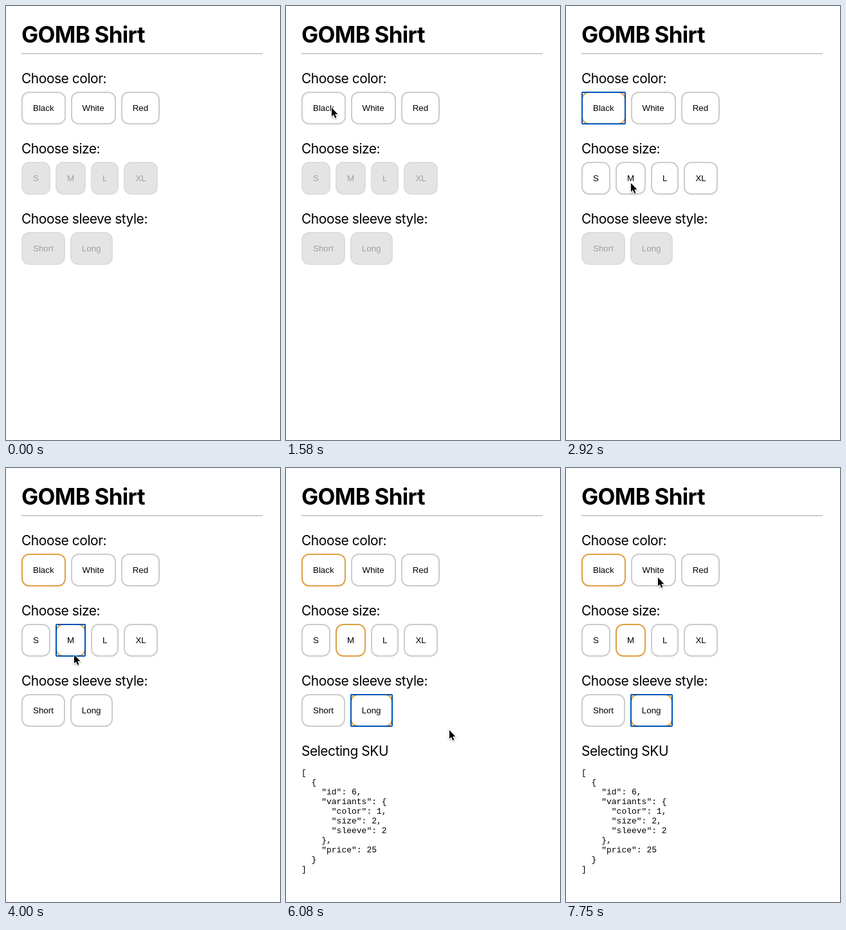
An HTML page for the animation above (8000 ms loop, 426x674 px).

```html
<!DOCTYPE html>
<html lang="en">
<head>
<meta charset="utf-8">
<title>Shirt options</title>
<style>
html, body { margin: 0; width: 100%; height: 100%; overflow: hidden; background: #fff; color: #000; }
body { position: relative; font-family: Inter, sans-serif; cursor: default; }
h1, h2, section, pre, #cursor { position: absolute; margin: 0; }
h1 {
  left: 24px; top: 24px; width: 375px; height: 49px; border-bottom: 2px solid #ccc;
  font-size: 35px; line-height: 40px; letter-spacing: -.021em; white-space: nowrap;
}
section { left: 24px; }
h2 { left: 0; top: 1px; font-size: 21px; font-weight: 400; line-height: 26px; letter-spacing: -.023em; white-space: nowrap; }
.row { display: flex; gap: 8px; margin-top: 34px; }
.option {
  position: relative; box-sizing: border-box; height: 51px; padding: 0 16px;
  border: 2px solid #ccc; border-radius: 12px;
  font: 13.333px/47px "Liberation Sans", Arial, sans-serif;
}
.off .option { background: #e4e4e4; border-color: #ddd; color: #a0a0a0; }
.option.picked { border-color: #dfa044; }
.option.focus::after {
  content: ""; position: absolute; inset: -2px; border: 2px solid #0053b6; border-radius: 2px;
}
pre { left: 0; top: 40px; font: 13px/15px "Liberation Mono", Courier, monospace; }
#cursor { left: 0; top: 0; overflow: visible; filter: drop-shadow(0 1px 1px #0005); }
</style>
</head>
<body>
<h1>GOMB Shirt</h1>
<svg id="cursor" width="14" height="20">
  <path d="M0 0V13.6L3 10.8 5.3 16 7.4 15.1 5.2 10H9.4Z" stroke="#fff" stroke-width="2" paint-order="stroke"/>
</svg>
<script>
const LOOP = 8000, FPS = 12, CLICK = 166;
const groups = [
  { title: "Choose color:", options: ["Black", "White", "Red"], pick: "Black", press: 2080 },
  { title: "Choose size:", options: ["S", "M", "L", "XL"], pick: "M", press: 3580 },
  { title: "Choose sleeve style:", options: ["Short", "Long"], pick: "Long", press: 4915 },
];
const sku = [{ id: 6, variants: { color: 1, size: 2, sleeve: 2 }, price: 25 }];
// where each pointer move ends, and when it runs
const moves = [
  { from: 420, to: 750, x: 382, y: 429 },
  { from: 920, to: 1580, x: 71, y: 158 },
  { from: 2420, to: 3040, x: 105, y: 288 },
  { from: 3920, to: 4750, x: 139, y: 379 },
  { from: 5590, to: 5830, x: 259, y: 420 },
  { from: 6050, to: 6250, x: 187, y: 239 },
  { from: 6340, to: 6920, x: 143, y: 170 },
];
const cursor = document.getElementById("cursor");

function add(parent, tag, text = "", className = "") {
  const el = document.createElement(tag);
  el.textContent = text;
  el.className = className;
  return parent.appendChild(el);
}

function addSection(index, title) {
  const section = add(document.body, "section");
  section.style.top = 99 + 109 * index + "px";
  add(section, "h2", title);
  return section;
}

groups.forEach((g, i) => {
  g.el = addSection(i, g.title);
  const row = add(g.el, "div", "", "row");
  for (const name of g.options) {
    const option = add(row, "div", name, "option");
    if (name === g.pick) g.choice = option;
  }
});
const result = addSection(groups.length, "Selecting SKU");
add(result, "pre", JSON.stringify(sku, null, 2));
document.body.append(cursor);

function pointerAt(t) {
  let x = 387, y = 430;
  for (const m of moves) {
    const k = Math.min(1, Math.max(0, (t - m.from) / (m.to - m.from)));
    const ease = k * k * (3 - 2 * k);
    x += (m.x - x) * ease;
    y += (m.y - y) * ease;
  }
  return [x, y].map(Math.round);
}

function draw(now) {
  const t = Math.floor((now % LOOP + 4) * FPS / 1000) * 1000 / FPS % LOOP;
  let ready = true;
  groups.forEach((g, i) => {
    const picked = t >= g.press + CLICK;
    const nextPress = groups[i + 1]?.press ?? LOOP;
    g.el.classList.toggle("off", !ready);
    g.choice.classList.toggle("picked", picked);
    g.choice.classList.toggle("focus", t >= g.press && t < nextPress);
    ready = picked;
  });
  result.hidden = !ready;
  const [x, y] = pointerAt(t);
  cursor.style.visibility = t < 500 ? "hidden" : "visible";
  cursor.style.transform = `translate(${x}px, ${y}px)`;
  requestAnimationFrame(() => draw(performance.now() - start));
}
const start = performance.now();
draw(0);
</script>
</body>
</html>
```
